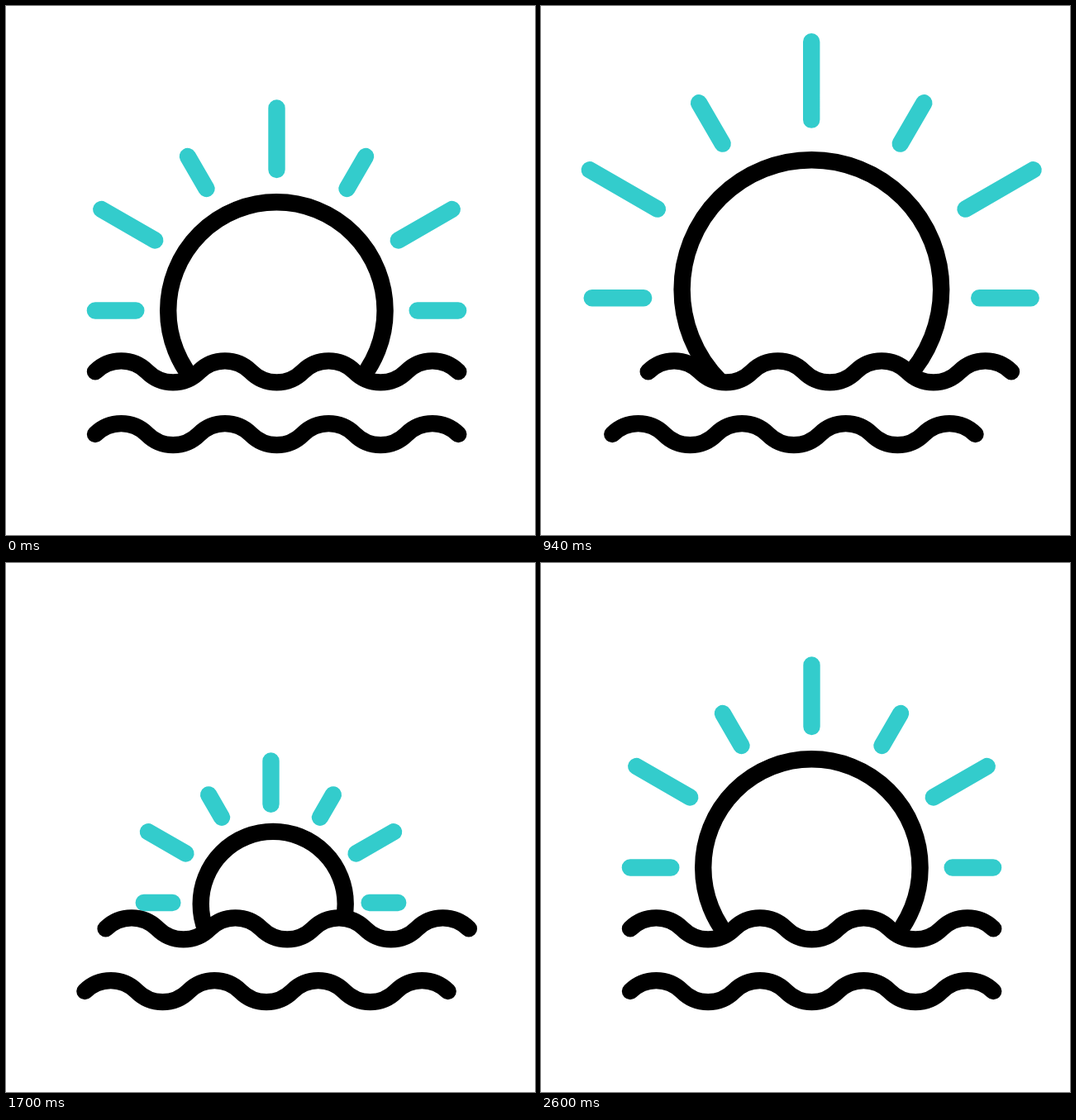
Recreate the animation shown at these times as an HTML page with a canvas. Size 640 by 640 pixels, loop 2.82 s.

```html
<!DOCTYPE html>
<html lang="en">
<head>
<meta charset="utf-8">
<title>Sun over the sea</title>
<style>
  html, body { margin: 0; width: 100%; height: 100%; overflow: hidden; background: #fff; }
  canvas { display: block; }
</style>
</head>
<body>
<canvas id="stage" width="640" height="640"></canvas>
<script>
const ctx = document.getElementById('stage').getContext('2d');
const LOOP = 2820, STEP = 20, HOLD_STEPS = 10, STEPS = 120;
const STROKE = 20.4, TEAL = '#33cccc', BLACK = '#000';
const HALF_WAVE = 62.75, WAVE_COUNT = 7;

// Poses: sun centre and radius, ray origin, ray scale, inward shift of the level rays
const REST = { x: 327.4, y: 368.5, r: 131.2, rayX: 327.5, rayY: 368.5, scale: 1, inset: 0 };
const HIGH = { x: 327.4, y: 342.7, r: 157.1, rayX: 327.2, rayY: 353, scale: 1.268, inset: 12.4 };
const LOW = { x: 323.2, y: 412.4, r: 87.5, rayX: 320.5, rayY: 411, scale: 0.7, inset: 0 };

// Rays of the right half as [outer x, outer y, inner x, inner y] from the ray origin
const RAYS = [
  [107.6, -186.5, 85, -147.5],
  [212.2, -122.5, 147.3, -85.1]
];
const TOP_RAY = [0, -245.1, 0, -170.4];
const LEVEL_RAY = [219.6, 0, 170.2, 0];

const smooth = t => t * t * (3 - 2 * t);

// Bezier easing (1/3, 0, 0, 1): quick rise, long settling
function settle(x) {
  let lo = 0, hi = 1;
  for (let i = 0; i < 30; i++) {
    const t = (lo + hi) / 2;
    if (t * (1 - t) ** 2 + t ** 3 < x) lo = t; else hi = t;
  }
  return smooth(lo);
}

function mix(a, b, k) {
  const pose = {};
  for (const key in a) pose[key] = a[key] + (b[key] - a[key]) * k;
  return pose;
}

function poseAt(n) {
  if (n < 45) return mix(REST, HIGH, settle(n / 45));
  if (n < 75) return mix(HIGH, LOW, smooth((n - 45) / 30));
  return mix(LOW, REST, smooth((n - 75) / 45));
}

function swayAt(n) {
  return 25.2 * smooth(1 - Math.abs(n % 60 - 30) / 30);
}

// Alternating quarter-circle arcs along a level line
function traceWave(x, y) {
  const radius = HALF_WAVE / Math.SQRT2, q = Math.PI / 4;
  for (let i = 0; i < WAVE_COUNT; i++) {
    const cx = x + HALF_WAVE * (i + 0.5);
    if (i % 2) ctx.arc(cx, y - HALF_WAVE / 2, radius, 3 * q, q, true);
    else ctx.arc(cx, y + HALF_WAVE / 2, radius, -3 * q, -q);
  }
}

function drawWave(x, y) {
  ctx.beginPath();
  traceWave(x, y);
  ctx.stroke();
}

function drawSun(pose, waveX, waveY) {
  ctx.save();
  ctx.beginPath();
  ctx.moveTo(0, 0);
  ctx.lineTo(0, waveY);
  traceWave(waveX, waveY);
  ctx.lineTo(640, waveY);
  ctx.lineTo(640, 0);
  ctx.clip();
  ctx.beginPath();
  ctx.arc(pose.x, pose.y, pose.r, 0, Math.PI * 2);
  ctx.stroke();
  ctx.restore();
}

function drawRays({ rayX, rayY, scale, inset }) {
  const ray = ([ox, oy, ix, iy], side, shift = 0) => {
    ctx.moveTo(rayX + side * (ox * scale - shift), rayY + oy * scale);
    ctx.lineTo(rayX + side * (ix * scale - shift), rayY + iy * scale);
  };
  ctx.beginPath();
  ray(TOP_RAY, 1);
  for (const side of [-1, 1]) {
    for (const line of RAYS) ray(line, side);
    ray(LEVEL_RAY, side, inset);
  }
  ctx.stroke();
}

function draw(time) {
  const n = Math.min(STEPS, Math.max(0, Math.floor(time / STEP) - HOLD_STEPS));
  const pose = poseAt(n), sway = swayAt(n);
  const left = 108, upper = 442.4, lower = 518.1;

  ctx.fillStyle = '#fff';
  ctx.fillRect(0, 0, 640, 640);
  ctx.lineWidth = STROKE;
  ctx.lineCap = ctx.lineJoin = 'round';

  ctx.strokeStyle = TEAL;
  drawRays(pose);
  ctx.strokeStyle = BLACK;
  drawSun(pose, left + sway, upper);
  drawWave(left + sway, upper);
  drawWave(left - sway, lower);
}

const start = performance.now();
function tick() {
  draw((performance.now() - start) % LOOP);
  requestAnimationFrame(tick);
}
tick();
</script>
</body>
</html>
```
